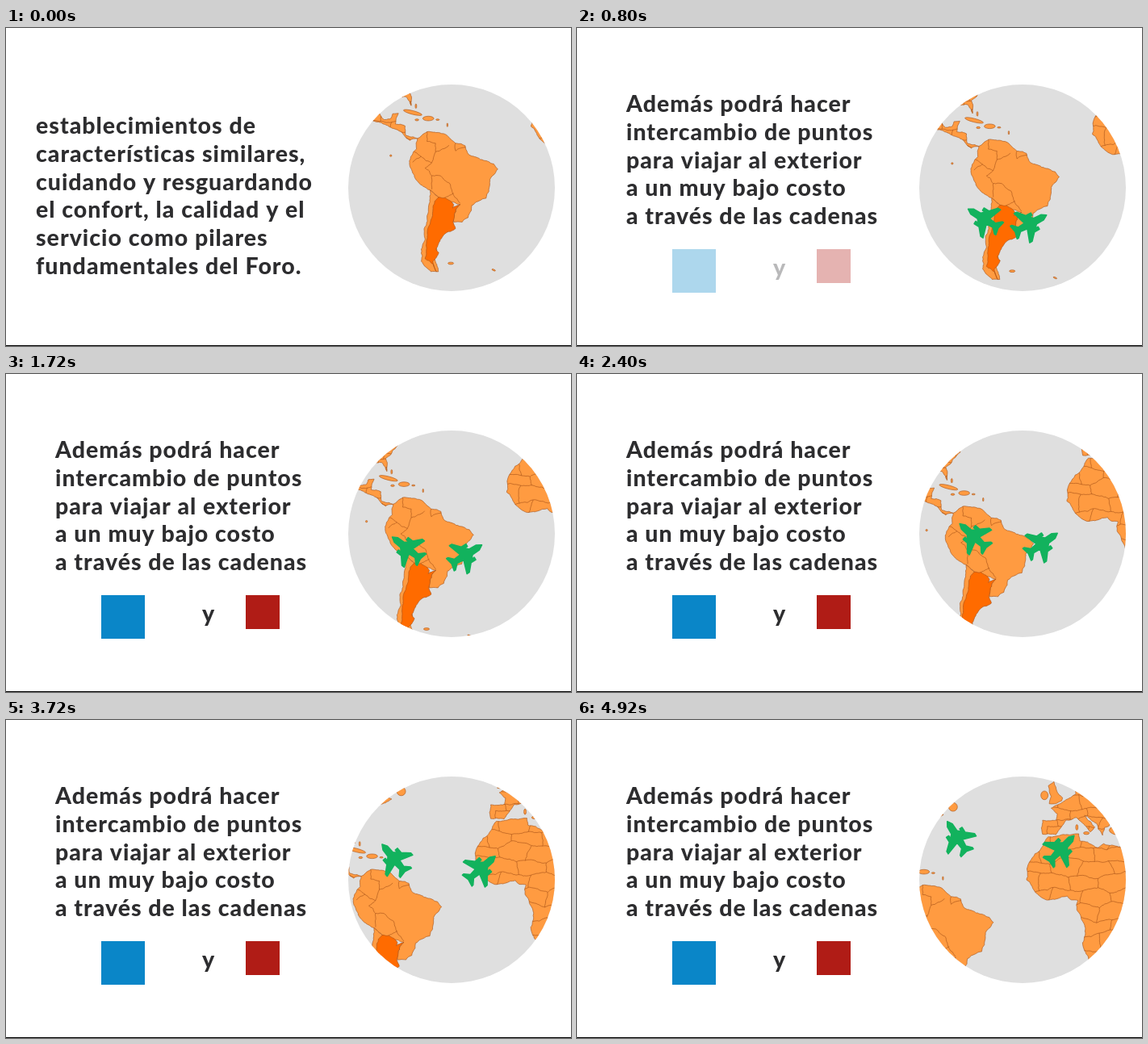
Recreate the animation shown at these times as an HTML page with a canvas. Size 700x394 px, loop 4.96 s.

```html
<!DOCTYPE html>
<html lang="es">
<head>
<meta charset="utf-8">
<style>
  html, body { margin: 0; width: 100%; height: 100%; overflow: hidden; background: #fff; }
  canvas { display: block; }
</style>
</head>
<body>
<canvas id="stage" width="700" height="394"></canvas>
<script>
const ctx = document.getElementById('stage').getContext('2d');
const LOOP = 4960, HOLD = 240, STEP = 40;
const SCALE = 2.36;
const LAND = '#ff9b41', COUNTRY = '#ff6b00', BORDER = '#a34f17', GREEN = '#12b25d', INK = '#2d2d2f';

// Coarse longitude / latitude corners; roughen() adds the small detail.
const northAmerica = [-57,52, -66,50, -64.5,46.5, -61,45.6, -66,43.5, -70,42, -76,36, -81,31.5, -80.3,25.2,
  -83,29.5, -94,29.5, -97.5,22.5, -94.5,18.2, -91,18.8, -90,21.2, -87,21.4, -88.6,16, -83.5,15,
  -83,10, -77,8.5, -81,7.5, -87.5,13, -95,16, -105,20, -115,40];
const southAmerica = [-77,8.5, -72,12, -62,10.5, -57,6, -52,4.8, -50,0, -44,-2.5, -37,-4.8, -34.8,-7.5,
  -39,-13, -39.5,-19, -41,-22.5, -48.5,-26, -48.7,-28.5, -53.5,-34, -58,-34, -57.6,-30.2, -54.6,-25.6,
  -66,-22, -68.5,-20, -70.3,-18.4, -76,-15, -81,-6, -80.5,-1, -77.5,3];
const chile = [-70.3,-18.4, -66,-22, -68,-50, -66,-55, -70,-55, -75,-51, -75,-46, -73,-42, -73.5,-37, -71.5,-30, -70.5,-23];
const argentina = [-66,-22, -62.6,-22.2, -58,-25.5, -58.6,-27.3, -54.6,-25.6, -57.6,-30.2, -58.3,-34, -57,-37,
  -62,-39, -65,-42, -67.3,-46, -65.8,-47.5, -69,-51, -67,-55, -68.6,-52.2, -73,-50, -71.7,-40, -70,-33, -68,-24];
const africa = [-6,35.8, 10,37.2, 10.5,34, 20,30.7, 23,32.6, 32.5,31.2, 37.5,19, 43,11.5, 39,-7, 40.5,-14,
  35,-20, 31,-30, 27,-33.7, 19,-34.5, 12,-18, 13.5,-11, 9,-1, 9.5,4, 6,4.3, 4,6.3, -7.6,4.5,
  -13.3,9, -17.4,14.7, -17,21, -13,27.8, -9.7,30.5];
const europe = [-9,43.2, -1.7,43.4, -1.2,46, -4.5,48.3, 2,51, 8.5,54, 8.2,57, 10.5,54.5, 19,54.5, 22,57,
  40,57, 40,46, 28,44, 26,40.8, 23.5,40, 22.5,36.5, 19.4,41.8, 13,45.3, 18.4,40.2, 16,38, 12,42,
  8.8,44.4, 3.2,43.2, -.3,39, -2,36.8, -9,37];
const britain = [-5.5,50.1, -4.5,53, -6,57, -3,58.5, -1.5,55, 1.5,52.5, 1,51.2];

// Islands as centre, half width, half height, tilt
const islands = [
  [-79.5,21.8,5,.8,.25], [-71.3,18.8,2.9,1,0], [-77.3,18.1,1,.4,0], [-66.4,18.2,.9,.3,0],
  [-61.3,15.5,.3,.8,0], [-77.8,25,.4,1,0], [-91,-.5,.5,.4,0], [-59.5,-51.8,1.5,.5,0],
  [-37,-54.4,1,.3,.4], [-56,48.8,2.3,1.9,0], [-8,53.4,1.9,1.9,0], [14,37.5,1.5,.6,0],
  [9,40.1,.6,1.2,0], [33,38.8,7,2.3,0]
];

const brazilWest = [-60.5,5, -64,3, -67.5,1.5, -69.5,-4.2, -73,-7, -69.5,-11, -65,-11, -60,-15, -58,-21, -54.6,-25];
const andes = [
  [-72,12, -72,7, -67.5,6, -67.5,1.5], [-69.5,-4.2, -75,-1, -79.5,-4], [-75,-1, -78.8,1.5],
  [-69.5,-11, -69.5,-18], [-58,-20, -62.6,-22.2], [-57,6, -57,2, -51.7,4]
];

const miller = lat => 71.62 * Math.log(Math.tan(Math.PI / 4 + lat * Math.PI / 450));
const project = (lon, lat) => [lon * SCALE, -miller(lat) * SCALE];
const pairs = flat => flat.flatMap((v, i) => i % 2 ? [] : [project(v, flat[i + 1])]);

function noise(x, y) {
  const n = Math.sin(x * 12.9898 + y * 78.233) * 43758.5453;
  return (n - Math.floor(n)) * 2 - 1;
}

// Midpoint displacement, seeded by position so that shared edges agree.
function roughen(path, [ax, ay], [bx, by]) {
  const length = Math.hypot(bx - ax, by - ay);
  if (length < 3) return path.lineTo(bx, by);
  const mx = (ax + bx) / 2, my = (ay + by) / 2, amount = Math.min(length, 20) * 0.1;
  const mid = [mx + noise(mx, my) * amount, my + noise(my, mx) * amount];
  roughen(path, [ax, ay], mid);
  roughen(path, mid, [bx, by]);
}

function outline(points, closed) {
  const path = new Path2D();
  path.moveTo(...points[0]);
  points.slice(1).forEach((p, i) => roughen(path, points[i], p));
  if (closed) {
    roughen(path, points[points.length - 1], points[0]);
    path.closePath();
  }
  return path;
}

function island([lon, lat, w, h, tilt]) {
  const path = new Path2D();
  const [x, y] = project(lon, lat);
  path.ellipse(x, y, w * SCALE, h * SCALE * 1.2, tilt, 0, Math.PI * 2);
  return path;
}

// Jittered brick pattern that reads as country borders
function countryGrid(x0, y0, x1, y1, cell) {
  const grid = new Path2D();
  const node = (i, j) => {
    const x = x0 + i * cell, y = y0 + j * cell;
    return [x + noise(x, y) * cell * 0.3, y + noise(y, x) * cell * 0.3];
  };
  const edge = (a, b) => { grid.moveTo(...a); roughen(grid, a, b); };
  for (let i = 0; x0 + i * cell < x1; i++) {
    for (let j = 0; y0 + j * cell < y1; j++) {
      edge(node(i, j), node(i + 1, j));
      if ((i + j) % 2 === 0) edge(node(i, j), node(i, j + 1));
    }
  }
  return grid;
}

const shape = flat => outline(pairs(flat), true);
const divided = [
  { land: shape(africa), grid: countryGrid(-45, -95, 110, 85, 18) },
  { land: shape(europe), grid: countryGrid(-15, -150, 100, -80, 13) },
  { land: shape(northAmerica), grid: countryGrid(-280, -130, -130, -15, 11) }
];
const plain = [southAmerica, chile, britain].map(shape).concat(islands.map(island));
const frontiers = [brazilWest, ...andes].map(f => outline(pairs(f), false));
const highlighted = shape(argentina);

const halfPlane = [[0,-24], [3.6,-18], [4,-8], [8,-4], [8,-8], [11.5,-8], [11.5,-1],
  [20.5,7], [20.5,10.5], [4,5], [3,14], [9,20], [9,22], [0,20]];
const planePath = new Path2D();
halfPlane.forEach(([x, y]) => planePath.lineTo(x, y));
[...halfPlane].reverse().forEach(([x, y]) => planePath.lineTo(-x, y));
planePath.closePath();

const ramp = (t, from, to) => Math.min(1, Math.max(0, (t - from) / (to - from)));

function paint(path, color) {
  ctx.fillStyle = color;
  ctx.fill(path);
  ctx.stroke(path);
}

function drawMap(t) {
  ctx.save();
  ctx.beginPath();
  ctx.arc(552, 198, 128, 0, Math.PI * 2);
  ctx.fillStyle = '#dfdfdf';
  ctx.fill();
  ctx.clip();
  const s = Math.max(0, t - HOLD + STEP) / 1000;
  ctx.translate(691.5 - 19.8 * s, 157 + 16.1 * s);
  ctx.lineWidth = 0.6;
  ctx.lineJoin = 'round';
  ctx.strokeStyle = BORDER;
  divided.forEach(({ land, grid }) => {
    paint(land, LAND);
    ctx.save();
    ctx.clip(land);
    ctx.stroke(grid);
    ctx.restore();
  });
  plain.forEach(p => paint(p, LAND));
  frontiers.forEach(p => ctx.stroke(p));
  paint(highlighted, COUNTRY);
  ctx.restore();
}

function drawPlane(x, y, degrees, alpha) {
  ctx.save();
  ctx.globalAlpha = alpha;
  ctx.translate(x, y);
  ctx.rotate(degrees * Math.PI / 180);
  ctx.fillStyle = ctx.strokeStyle = GREEN;
  ctx.lineWidth = 1.6;
  ctx.lineJoin = 'round';
  ctx.fill(planePath);
  ctx.stroke(planePath);
  ctx.restore();
}

function drawLines(lines, x, y, alpha) {
  ctx.globalAlpha = alpha;
  ctx.fillStyle = INK;
  lines.forEach((line, i) => ctx.fillText(line, x, y + i * 34.8));
  ctx.globalAlpha = 1;
}

function drawSquare(cx, cy, size, color, alpha) {
  ctx.globalAlpha = alpha;
  ctx.fillStyle = color;
  ctx.fillRect(cx - size / 2, cy - size / 2, size, size);
  ctx.globalAlpha = 1;
}

const intro = ['establecimientos de', 'características similares,', 'cuidando y resguardando',
  'el confort, la calidad y el', 'servicio como pilares', 'fundamentales del Foro.'];
const offer = ['Además podrá hacer', 'intercambio de puntos', 'para viajar al exterior',
  'a un muy bajo costo', 'a través de las cadenas'];

function draw(now) {
  const t = Math.floor((now % LOOP) / STEP) * STEP;
  ctx.fillStyle = '#fff';
  ctx.fillRect(0, 0, 700, 394);
  ctx.fillStyle = '#000';
  ctx.fillRect(0, 393, 700, 1);

  drawMap(t);
  const s = (t - 800) / 1000;
  const planeAlpha = ramp(t, 360, 640);
  drawPlane(505 - 8.1 * s, 237 - 22.1 * s, -58 + 6.2 * s, planeAlpha);
  drawPlane(560.5 + 9.4 * s, 243 - 20 * s, 62 - 4.4 * s, planeAlpha);

  ctx.font = '800 28.5px Lato, sans-serif';
  ctx.letterSpacing = '1px';
  drawLines(intro, 37, 131, 1 - ramp(t, 200, 400));
  drawLines(offer, 61, 104, ramp(t, 360, 640));

  const brandAlpha = ramp(t, 640, 1120);
  drawSquare(145, 301, 54, '#0a86c8', brandAlpha);
  drawLines(['y'], 243, 307, brandAlpha);
  drawSquare(318, 295, 42, '#b01c16', brandAlpha);
}

function tick() {
  draw(performance.now());
  requestAnimationFrame(tick);
}
tick();
</script>
</body>
</html>
```
